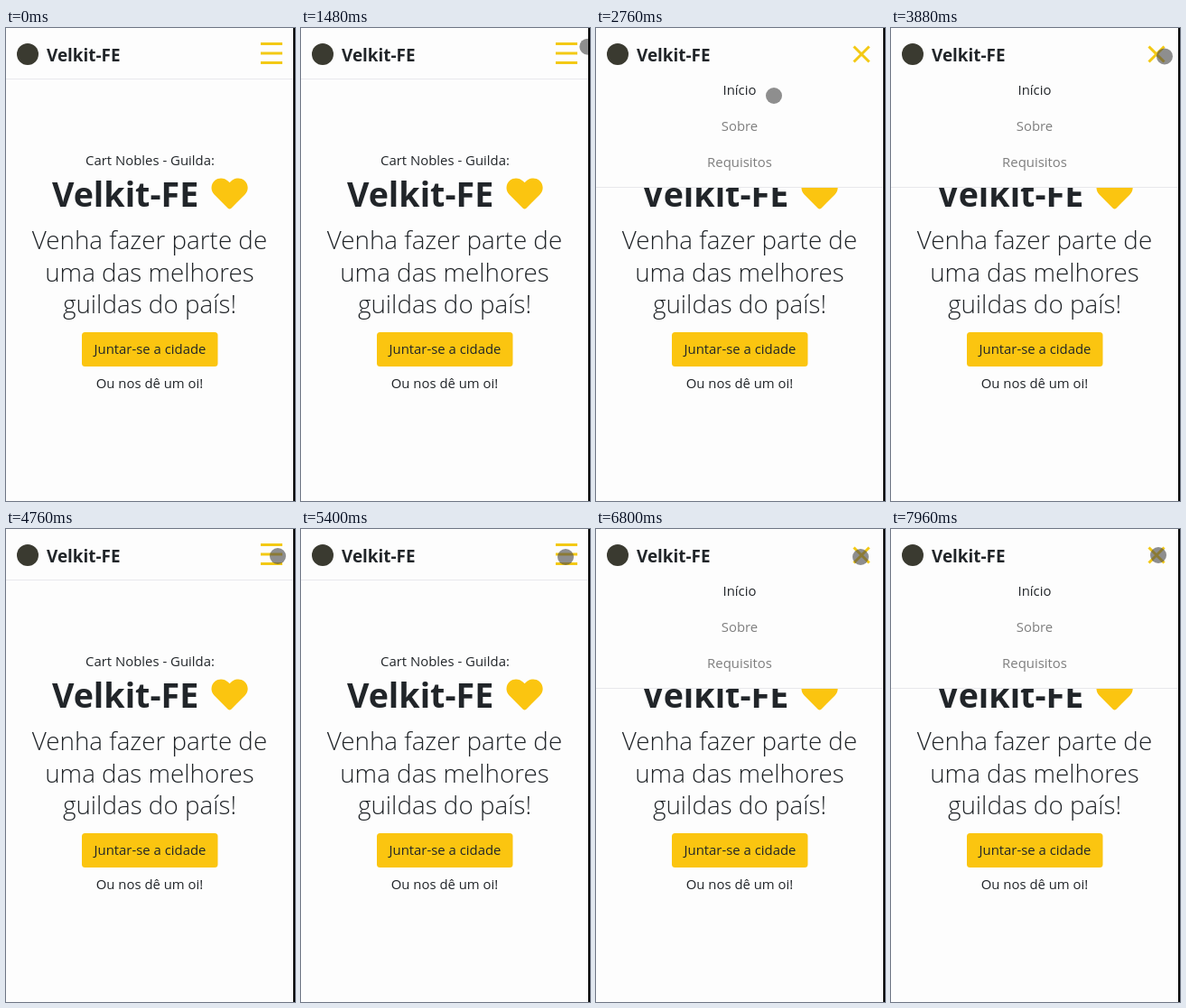
An HTML page that plays this animation: 320x524 px, repeating every 8 s.

```html
<!DOCTYPE html>
<html lang="pt-BR">
<head>
<meta charset="utf-8">
<title>Guilda</title>
<style>
  html, body { margin: 0; width: 100%; height: 100%; overflow: hidden; background: #fdfdfd; }
  svg { display: block; width: 320px; height: 524px; }
  text { font: 14.9px "Open Sans", "Noto Sans", sans-serif; fill: #212529; }
  .mid { text-anchor: middle; }
  .brand { font-size: 18.9px; font-weight: 700; }
  .title { font-size: 37.6px; font-weight: 700; }
  .lead { font-size: 27.8px; font-weight: 300; }
  .muted { fill: #7e7e7e; }
  .icon { fill: none; stroke: #f3c914; stroke-width: 3; }
  .accent { fill: #fbc510; }
  .page { fill: #fdfdfd; }
  .rule { stroke: #e8e8ec; }
</style>
</head>
<body>
<svg viewBox="0 0 320 524">
  <rect class="page" width="320" height="524"/>
  <text class="mid" x="159.5" y="152">Cart Nobles - Guilda:</text>
  <text class="title" x="51" y="198">Velkit-FE</text>
  <path class="accent" transform="translate(227.5 164) scale(.0785 .076)" d="M462 63C408 16 326 24 276 76L256 97L236 76C186 24 104 16 50 63C-13 116-16 212 40 270L233 470C246 483 266 483 279 470L472 270C528 212 525 116 462 63Z"/>
  <g class="mid">
    <g id="lead"></g>
    <rect class="accent" x="84" y="337" width="150.5" height="38" rx="3.5"/>
    <text x="159.5" y="361">Juntar-se a cidade</text>
    <text x="159" y="399">Ou nos dê um oi!</text>
  </g>

  <rect class="page" width="320" height="56"/>
  <g id="closed">
    <path class="rule" d="M0 56.5H320"/>
    <path class="icon" d="M282 17.5h24m-24 10.5h24m-24 10.5h24"/>
  </g>
  <g id="open" class="mid">
    <rect class="page" y="50" width="320" height="126"/>
    <path class="rule" d="M0 176.5H320"/>
    <path class="icon" d="M285.5 20.5l17 17m0-17l-17 17"/>
    <g id="menu"></g>
  </g>
  <circle cx="24" cy="29" r="12" fill="#3a3a30"/>
  <text class="brand" x="45" y="37">Velkit-FE</text>

  <circle id="pointer" r="9" fill="rgb(75 75 75 / .62)"/>
  <rect x="318" width="2" height="524"/>
</svg>
<script>
  const LOOP = 8000;
  const clicks = [2240, 4520, 6200];
  const entry = { x: 327.5, y: 16 };
  const glides = [
    { from: 1280, to: 1800, x: 297, y: 30 },
    { from: 2200, to: 2760, x: 197, y: 75 },
    { from: 3400, to: 3960, x: 309, y: 29 },
    { from: 4400, to: 5120, x: 293, y: 31 },
    { from: 6920, to: 7280, x: 250, y: 28 },
    { from: 7640, to: 7960, x: 296, y: 29 }
  ];
  const byId = id => document.getElementById(id);
  const [closed, open, pointer] = ['closed', 'open', 'pointer'].map(byId);

  function addLines(id, lines, y, step, style) {
    byId(id).innerHTML = lines.map((line, i) =>
      `<text class="${style(i)}" x="159" y="${y + i * step}">${line}</text>`).join('');
  }

  function ease(t, from, to) {
    const p = Math.min(1, Math.max(0, (t - from) / (to - from)));
    return p * p * (3 - 2 * p);
  }

  function pointerAt(t) {
    let { x, y } = entry;
    for (const g of glides) {
      const k = ease(t, g.from, g.to);
      x += (g.x - x) * k;
      y += (g.y - y) * k;
    }
    return [x, y];
  }

  function draw() {
    const t = performance.now() % LOOP;
    const isOpen = clicks.filter(at => t >= at).length % 2 === 1;
    open.style.display = isOpen ? '' : 'none';
    closed.style.display = isOpen ? 'none' : '';
    pointer.setAttribute('transform', `translate(${pointerAt(t)})`);
    requestAnimationFrame(draw);
  }

  addLines('lead', ['Venha fazer parte de', 'uma das melhores', 'guildas do país!'], 245, 35.5, () => 'lead');
  addLines('menu', ['Início', 'Sobre', 'Requisitos'], 74, 40, i => i ? 'muted' : '');
  draw();
</script>
</body>
</html>
```
